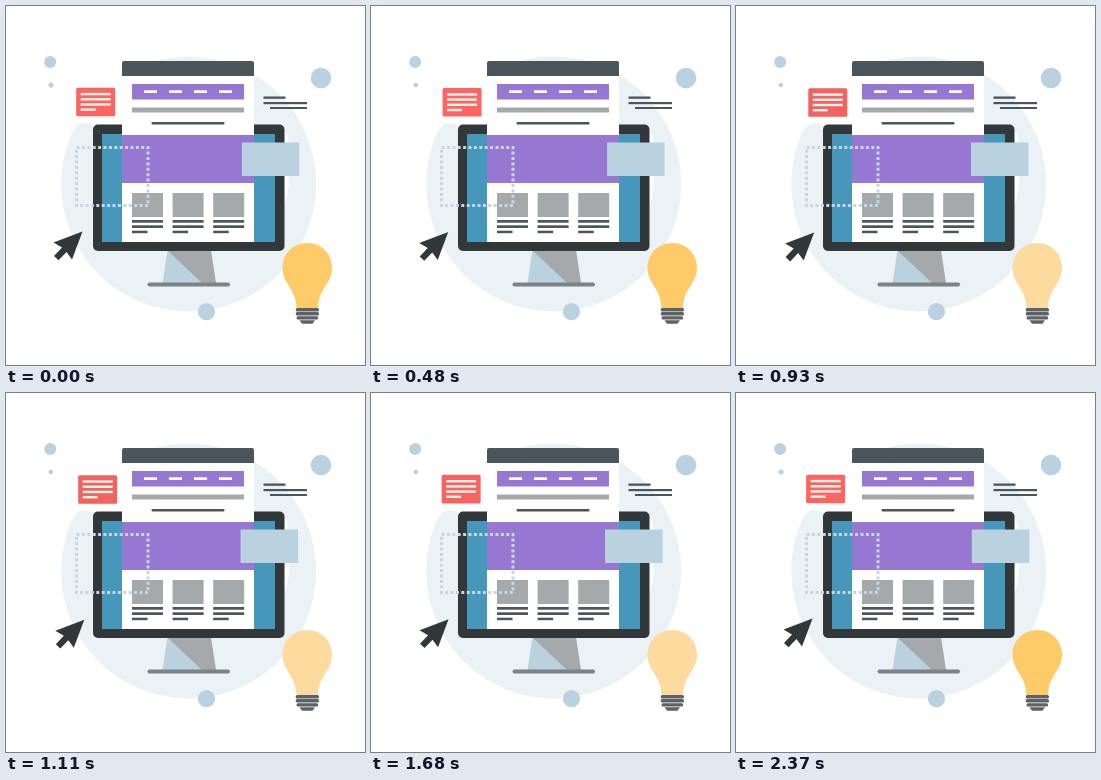
Animation, 359 px wide and 359 px high, one loop 2400 ms. Source, as an HTML page:

```html
<!DOCTYPE html>
<html lang="en">
<head>
<meta charset="utf-8">
<title>Web design</title>
<style>
html, body { margin: 0; width: 100%; height: 100%; overflow: hidden; background: #fff; }
svg { display: block; width: 100vw; height: 100vh; }
.ink { fill: #4a555c; }
.dark { fill: #32373a; }
.sky { fill: #bad2e0; }
.violet { fill: #9678d2; }
.grey { fill: #a5a9ac; }
.white { fill: #fff; }
</style>
</head>
<body>
<svg viewBox="0 0 359 359">
  <circle cx="182.7" cy="178" r="127.5" fill="#eaf2f6"/>
  <path class="white" d="M45 40H118V120H87Q84 117 78 117Q71 117 66 127L45 150Z"/>
  <path class="white" d="M278 124Q282 128 283 140V178Q282 192 278 200Z"/>

  <circle class="sky" cx="44.2" cy="56" r="6"/>
  <circle class="sky" cx="315" cy="72" r="10.3"/>
  <circle class="sky" cx="200.5" cy="305.7" r="8.6"/>
  <circle class="sky" id="dot" cx="44.8" cy="79" r="2.3"/>
  <path class="sky" id="gem" d="M45 75.8L48.2 79L45 82.2L41.8 79Z"/>

  <path class="sky" d="M161.5 244H190L210 277H156.5Z"/>
  <path class="grey" d="M161 244H205L210 277H196Z"/>
  <rect x="141.5" y="276.5" width="82.5" height="4" rx="2" fill="#7d8286"/>
  <rect class="dark" x="87" y="118.5" width="191.5" height="126.5" rx="5"/>
  <rect x="96" y="128" width="173" height="108" fill="#4797ba"/>

  <rect class="white" x="116" y="69" width="132" height="167"/>
  <path class="ink" d="M116 70V57Q116 55 118 55H246Q248 55 248 57V70Z"/>
  <rect class="violet" x="126" y="78" width="112" height="15.5"/>
  <rect class="grey" x="126" y="101.5" width="112" height="5"/>
  <rect class="ink" x="145.5" y="116" width="73" height="2.5" rx="1"/>
  <rect class="violet" x="116" y="129" width="132" height="48"/>
  <g id="page"></g>

  <rect x="70.5" y="141.5" width="71.5" height="58" fill="none" stroke="#c6d7e2" stroke-width="3" stroke-dasharray="3 2.4"/>

  <g class="ink">
    <rect x="257.5" y="90.5" width="22" height="2.3"/>
    <rect x="257.5" y="96" width="43.5" height="2.2"/>
    <rect x="264" y="101" width="37" height="2"/>
  </g>

  <rect class="sky" id="card" x="235" y="136.5" width="57.5" height="33.5"/>

  <g id="note">
    <rect id="noteBg" x="70" y="81.8" width="39" height="28.6" rx="1.5"/>
    <g fill="#fff3ee">
      <rect x="74.5" y="87" width="30" height="2.4"/>
      <rect x="74.5" y="92.2" width="30" height="2.4"/>
      <rect x="74.5" y="97.4" width="30" height="2.4"/>
      <rect x="74.5" y="102.6" width="15" height="2.4"/>
    </g>
  </g>

  <path class="dark" id="arrow" d="M76.5 225.5L47.5 236.5L56 241.5L48 250L52.5 254.3L60.5 246L66 253.5Z"/>

  <path id="bulb" d="M301.3 237C287 237 276.5 248 276.5 261.5C276.5 278 290 282 290.5 302H312C312.5 282 326 278 326 261.5C326 248 315.5 237 301.3 237Z"/>
  <g fill="#5c6265">
    <rect x="289.7" y="302" width="23.3" height="3.4" rx="1.5"/>
    <rect x="289.7" y="306.1" width="23.3" height="3.4" rx="1.5"/>
    <rect x="290.5" y="310.2" width="21.7" height="3.4" rx="1.5"/>
    <path d="M293.5 314.3H309L306.5 317.8H296Z"/>
  </g>
</svg>
<script>
const LOOP = 2400, STEP = 30;
const el = id => document.getElementById(id);
const rect = (cls, x, y, w, h) => `<rect class="${cls}" x="${x}" y="${y}" width="${w}" height="${h}"/>`;

let page = "";
for (let i = 0; i < 4; i++) page += rect("white", 138 + 25 * i, 84.3, 13, 2.7);
for (let i = 0; i < 3; i++) {
  const x = 126 + 40.6 * i;
  page += rect("grey", x, 187, 31, 24) + rect("ink", x, 214, 31, 2.7) +
    rect("ink", x, 219.3, 31, 2.7) + rect("ink", x, 224.7, 15.5, 2.5);
}
el("page").innerHTML = page;

// Cosine sway between -1 and 1, highest at the given time
const sway = (t, peak) => Math.cos((t - peak) / LOOP * 2 * Math.PI);
const ramp = (t, from, to) => Math.min(1, Math.max(0, (t - from) / (to - from)));
const mix = (a, b, k) => `rgb(${a.map((v, i) => Math.round(v + (b[i] - v) * k))})`;
const move = (id, x, y) => el(id).setAttribute("transform", `translate(${x.toFixed(2)} ${y.toFixed(2)})`);

function draw(t) {
  const note = sway(t, 930), tip = sway(t, 1150);
  move("note", 1.1 + 1.2 * note, 0.1 + 0.3 * note);
  move("card", 0.1 + 1.1 * sway(t, 300), 0);
  move("arrow", 0.9 + 0.9 * tip, 0.6 + 0.6 * tip);

  const pale = ramp(t, 570, 870) - ramp(t, 1710, 1950);
  el("bulb").setAttribute("fill", mix([254, 203, 104], [253, 218, 157], pale));
  const dim = ramp(t, 510, 900) - ramp(t, 1500, 1950);
  el("noteBg").setAttribute("fill", mix([253, 101, 97], [240, 99, 95], dim));

  const gem = t < 300 || t >= 1830;
  el("gem").style.display = gem ? "" : "none";
  el("dot").style.display = gem ? "none" : "";
}

const start = performance.now();
function tick(now) {
  const t = Math.max(0, now - start) % LOOP;
  draw(Math.floor(t / STEP) * STEP);
  requestAnimationFrame(tick);
}
draw(0);
requestAnimationFrame(tick);
</script>
</body>
</html>
```
